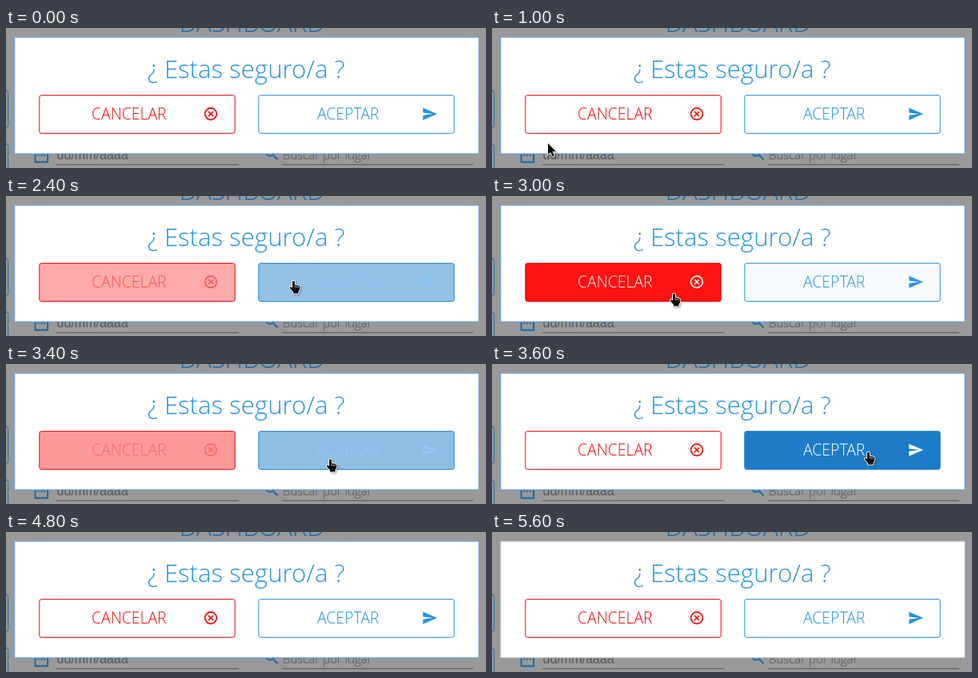
An HTML page with a canvas that plays this animation: 600 by 176 pixels, repeating every 6.2 s.

```html
<!DOCTYPE html>
<html lang="es">
<head>
<meta charset="utf-8">
<title>Confirmar</title>
<style>
html, body { margin: 0; width: 100%; height: 100%; overflow: hidden; background: #999; }
canvas { display: block; }
</style>
</head>
<body>
<canvas id="stage" width="600" height="176"></canvas>
<script>
const ctx = document.getElementById('stage').getContext('2d');
const LOOP = 6200;
const LIGHT = '"Open Sans", sans-serif';
const HEADING = `300 31.2px ${LIGHT}`;
const LABEL = `300 19.4px ${LIGHT}`;
const WHITE = [255, 255, 255];
const RED = [255, 0, 0];
const BLUE = [33, 146, 232];
const DEEP = [30, 124, 199];

// start time, hover level of each button, pointer shape and place
const poses = [
  { t: 0, cancel: 0, accept: 0 },
  { t: 1000, cancel: 0, accept: 0, pointer: 'arrow', x: 70, y: 145 },
  { t: 1200, cancel: 0.5, accept: 0, pointer: 'hand', x: 97, y: 113 },
  { t: 1400, cancel: 1, accept: 0, pointer: 'hand', x: 100, y: 105 },
  { t: 2000, cancel: 1, accept: 0, pointer: 'hand', x: 116, y: 107 },
  { t: 2200, cancel: 1, accept: 0, pointer: 'hand', x: 240, y: 105 },
  { t: 2400, cancel: 0.33, accept: 0.47, pointer: 'hand', x: 354, y: 106 },
  { t: 2600, cancel: 0, accept: 1, pointer: 'hand', x: 515, y: 101 },
  { t: 2800, cancel: 0, accept: 1, pointer: 'hand', x: 266, y: 122 },
  { t: 3000, cancel: 0.93, accept: 0.04, pointer: 'hand', x: 222, y: 122 },
  { t: 3200, cancel: 1, accept: 0, pointer: 'hand', x: 252, y: 120 },
  { t: 3400, cancel: 0.4, accept: 0.5, pointer: 'hand', x: 400, y: 119 },
  { t: 3600, cancel: 0, accept: 1, pointer: 'hand', x: 465, y: 110 },
  { t: 3800, cancel: 0, accept: 1, pointer: 'hand', x: 539, y: 106 },
  { t: 4000, cancel: 0, accept: 1, pointer: 'hand', x: 483, y: 115 },
  { t: 4200, cancel: 0, accept: 1, pointer: 'hand', x: 495, y: 100 },
  { t: 4400, cancel: 0, accept: 0.87, pointer: 'arrow', x: 545, y: 71 },
  { t: 4600, cancel: 0, accept: 0.03 },
  { t: 4800, cancel: 0, accept: 0 }
];

const shapes = {
  arrow: new Path2D('M0 0V14L3.2 11.2L5.6 16.5L8 15.5L5.6 10.3H10Z'),
  hand: new Path2D('M4 1.5Q5.5 -0.1 7 1.5V5.5L11.5 6.5Q13.5 7 13.5 9L13 12L11.5 14V16.5H5V14.5L1 10Q0.5 8 2.5 8.3L4 9.5Z')
};
const knuckles = new Path2D('M7.3 6.5V9M9.3 7V9.3M11.3 7.4V9.6');

// icons on a 24 unit grid
const send = new Path2D('M2 21L23 12L2 3V10L17 12L2 14Z');
const calendar = new Path2D('M3 4H21V22H3ZM5 9V20H19V9ZM7 11H9V13H7ZM11 11H13V13H11ZM15 11H17V13H15Z');
const lens = new Path2D('M16 9.5A6.5 6.5 0 1 1 3 9.5A6.5 6.5 0 1 1 16 9.5ZM14 9.5A4.5 4.5 0 1 0 5 9.5A4.5 4.5 0 1 0 14 9.5ZM13 14.3L14.3 13L15.5 14L20.5 19L19 20.5L14 15.5Z');

const mix = (a, b, k) => `rgb(${a.map((v, i) => Math.round(v + (b[i] - v) * k))})`;

function text(str, x, y, font, color, align = 'left') {
  ctx.font = font;
  ctx.fillStyle = color;
  ctx.textAlign = align;
  ctx.fillText(str, x, y);
}

function box(x, y, w, h, r, stroke, fill) {
  ctx.beginPath();
  ctx.roundRect(x, y, w, h, r);
  if (fill) {
    ctx.fillStyle = fill;
    ctx.fill();
  }
  ctx.strokeStyle = stroke;
  ctx.stroke();
}

function line(x1, y1, x2, y2, color, width = 1) {
  ctx.beginPath();
  ctx.moveTo(x1, y1);
  ctx.lineTo(x2, y2);
  ctx.strokeStyle = color;
  ctx.lineWidth = width;
  ctx.stroke();
  ctx.lineWidth = 1;
}

function icon(path, x, y, scale, color, rule = 'nonzero') {
  ctx.save();
  ctx.translate(x, y);
  ctx.scale(scale, scale);
  ctx.fillStyle = color;
  ctx.fill(path, rule);
  ctx.restore();
}

function page() {
  const blue = '#1569a8';
  ctx.fillStyle = '#999';
  ctx.fillRect(0, 0, 600, 176);
  text('DASHBOARD', 307.5, 5, HEADING, blue, 'center');
  box(-40.5, 78.5, 43.2, 47, 3, blue);
  box(-40.5, 145.5, 43.2, 47, 3, blue);

  icon(calendar, 32.7, 148.2, 0.97, blue, 'evenodd');
  text('dd/mm/aaaa', 63.6, 165, '16px "Liberation Sans", Arial, sans-serif', '#555');
  line(62.5, 171.8, 291, 171.8, '#555');

  icon(lens, 321, 147, 0.93, blue);
  text('Buscar por lugar', 346, 164.5, `300 15px ${LIGHT}`, '#505050');
  line(345, 171.8, 584, 171.8, '#555');
}

function cancelButton(level) {
  const ink = mix(RED, WHITE, level);
  box(41.8, 84.6, 244.4, 47.8, 2.5, mix(RED, RED, 0), mix(WHITE, RED, level));
  text('CANCELAR', 153.8, 115, LABEL, ink, 'center');
  ctx.beginPath();
  ctx.arc(256, 108, 7.3, 0, Math.PI * 2);
  ctx.strokeStyle = ink;
  ctx.lineWidth = 1.7;
  ctx.stroke();
  line(253, 105, 259, 111, ink, 1.7);
  line(259, 105, 253, 111, ink, 1.7);
}

function acceptButton(level) {
  const ink = mix(BLUE, WHITE, level);
  box(315.8, 84.6, 244.4, 47.8, 2.5, mix(BLUE, DEEP, level), mix(WHITE, DEEP, level));
  text('ACEPTAR', 427.7, 115, LABEL, ink, 'center');
  icon(send, 519.6, 98, 0.84, ink);
}

function pointer({ pointer: kind, x, y }) {
  if (!kind) return;
  const shape = shapes[kind];
  ctx.save();
  ctx.translate(x, y);
  ctx.lineJoin = 'round';
  ctx.lineWidth = 1.8;
  ctx.strokeStyle = '#fff';
  ctx.shadowColor = 'rgba(0,0,0,.4)';
  ctx.shadowBlur = 2;
  ctx.shadowOffsetX = ctx.shadowOffsetY = 1;
  ctx.stroke(shape);
  ctx.shadowColor = 'transparent';
  ctx.fillStyle = '#0a0a0a';
  ctx.fill(shape);
  if (kind === 'hand') {
    ctx.lineWidth = 0.7;
    ctx.stroke(knuckles);
  }
  ctx.restore();
}

function draw(t) {
  const pose = poses.findLast(p => p.t <= t);
  page();
  box(10.8, 11.8, 580.2, 146.2, 0, t < 5600 ? '#5f9fe6' : '#bdbdbd', '#fff');
  text('¿ Estas seguro/a ?', 300.2, 63, HEADING, mix(BLUE, BLUE, 0), 'center');
  cancelButton(pose.cancel);
  acceptButton(pose.accept);
  pointer(pose);
}

const start = performance.now();
function tick() {
  draw((performance.now() - start) % LOOP);
  requestAnimationFrame(tick);
}
tick();
</script>
</body>
</html>
```
